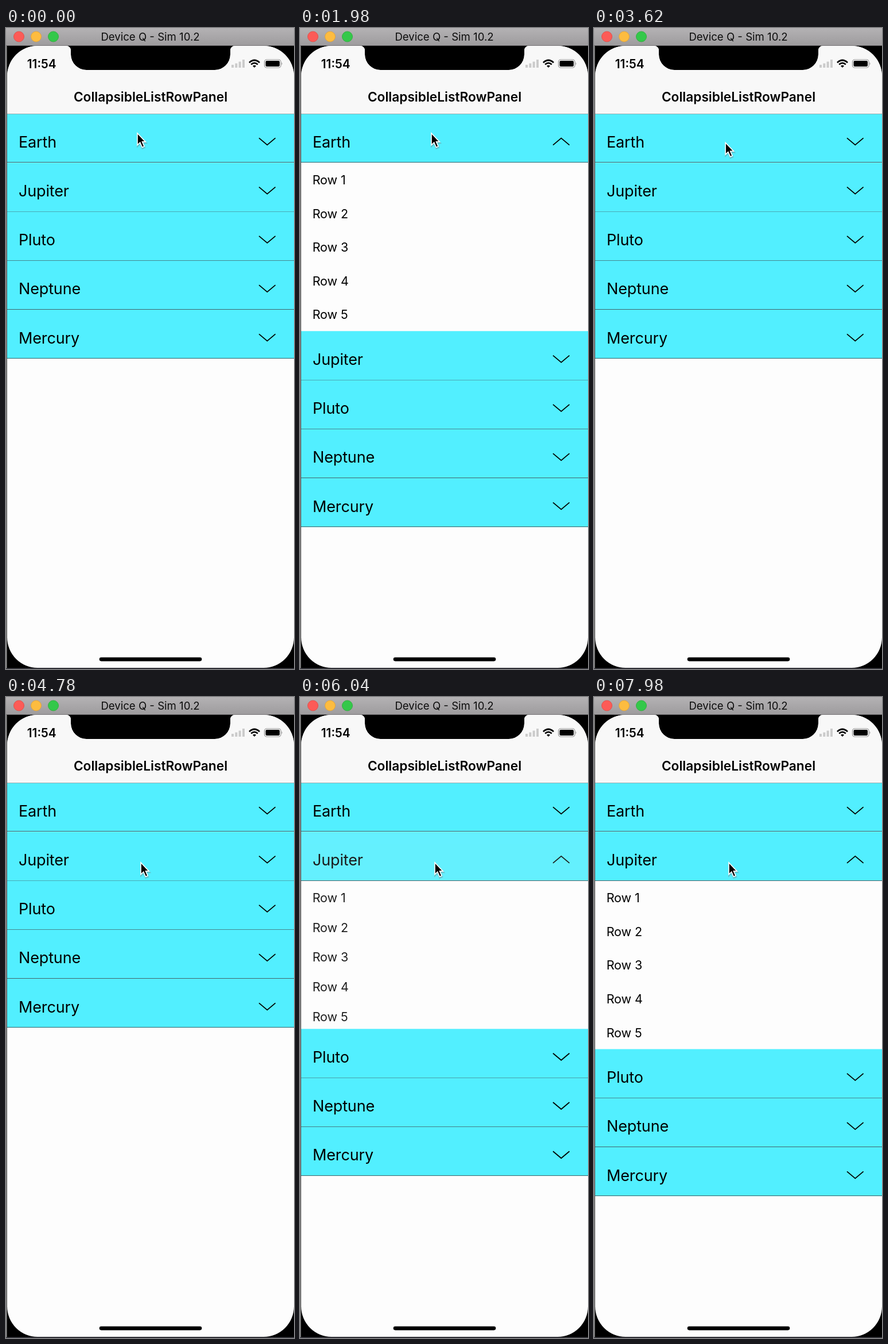
Animation, 502 px wide and 1115 px high, one loop 8 s. Source, as an HTML page:

```html
<!DOCTYPE html>
<html lang="en">
<head>
<meta charset="utf-8">
<title>Expandable list</title>
<style>
html, body { margin: 0; width: 100%; height: 100%; overflow: hidden; background: #000; }
svg { display: block; font-family: Inter, Roboto, sans-serif; }
.bold { font-weight: 600; }
.name { font-size: 27px; letter-spacing: -.15px; }
.row { font-size: 21.5px; letter-spacing: -.1px; }
.line { shape-rendering: crispEdges; }
.chevron { fill: none; stroke: #000; stroke-width: 1.8; }
</style>
</head>
<body>
<svg id="stage" width="502" height="1115" viewBox="0 0 502 1115">
  <defs>
    <linearGradient id="bar" x2="0" y2="1">
      <stop stop-color="#b4b2b4"/><stop offset="1" stop-color="#9d9b9d"/>
    </linearGradient>
    <clipPath id="screen">
      <path d="M2 84A53 53 0 0 1 55 31H105A8 8 0 0 1 113 39V46A27 27 0 0 0 140 73H364A27 27 0 0 0 391 46V39A8 8 0 0 1 399 31H449A53 53 0 0 1 502 84V1060A53 53 0 0 1 449 1113H55A53 53 0 0 1 2 1060Z"/>
    </clipPath>
    <path id="arrow" d="M0 0V20.5L4.7 16.2L8.3 24.5L12 22.9L8.5 14.9H14.2Z"/>
  </defs>

  <rect width="502" height="1115"/>
  <rect y="31" width="1.5" height="1084" fill="#969696"/>
  <rect y="1113.5" width="502" height="1.5" fill="#3c3c44"/>
  <rect width="502" height="31" fill="url(#bar)"/>
  <rect y="30" width="502" height="1" fill="#777577"/>
  <g stroke-width=".8">
    <circle cx="22.5" cy="15" r="9" fill="#fc5b57" stroke="#e2463f"/>
    <circle cx="52.5" cy="15" r="9" fill="#fdbc40" stroke="#e0a035"/>
    <circle cx="82.5" cy="15" r="9" fill="#34c84a" stroke="#27ab35"/>
  </g>
  <text x="251.5" y="22" font-size="18.6" text-anchor="middle" fill="#0c0c0c">Device Q - Sim 10.2</text>

  <g clip-path="url(#screen)">
    <rect y="31" width="502" height="1084" fill="#fdfdfd"/>
    <rect y="31" width="502" height="118" fill="#f8f8f8"/>
    <g id="list"></g>
    <rect class="line" y="149" width="502" height="1" fill="#93aeb2"/>
  </g>

  <text class="bold" x="36.8" y="69.5" font-size="20.8">11:54</text>
  <text class="bold" x="252" y="128" font-size="22.67" text-anchor="middle">CollapsibleListRowPanel</text>
  <path d="M393 64h4v5h-4zM399.3 61.5h4v7.5h-4zM405.6 58.5h4V69h-4zM412 55h4v14h-4z" fill="#cbcbcb"/>
  <g fill="none" stroke="#000" stroke-width="2.7">
    <path d="M424 60.2Q433 51.8 442 60.2M427.2 63.5Q433 58.2 438.8 63.5"/>
    <path d="M433 69L430 66Q433 63.4 436 66Z" fill="#000" stroke="none"/>
  </g>
  <rect x="450.5" y="55" width="28.5" height="14" rx="3.8" fill="none" stroke="#8f8f8f" stroke-width="1.2"/>
  <rect x="452.5" y="57" width="24.5" height="10" rx="2"/>
  <path d="M480.5 59.5Q482.5 62 480.5 64.5Z" fill="#8f8f8f"/>
  <rect x="162.7" y="1094.7" width="178.6" height="6.7" rx="3.3"/>

  <g id="cursor">
    <use href="#arrow" x=".5" y="1.8" fill="#777" stroke="#777" stroke-width="3" opacity=".35"/>
    <use href="#arrow" stroke="#fff" stroke-width="1.6"/>
  </g>
</svg>

<script>
const LOOP = 8000, TOP = 149, PITCH = 85.25, BODY = 293, FADE = 8;
const names = ['Earth', 'Jupiter', 'Pluto', 'Neptune', 'Mercury'];
const list = document.getElementById('list');
const cursor = document.getElementById('cursor');

function add(parent, tag, attrs, text) {
  const el = document.createElementNS('http://www.w3.org/2000/svg', tag);
  for (const key in attrs) el.setAttribute(key, attrs[key]);
  if (text) el.textContent = text;
  return parent.appendChild(el);
}

function addHeader(cell, name, open) {
  const g = add(cell, 'g', {});
  const [ends, tip] = open ? [54.6, 42.6] : [42.4, 54.4];
  add(g, 'rect', { width: 502, height: PITCH, fill: '#52efff' });
  add(g, 'text', { class: 'name', x: 22, y: 58.5 }, name);
  add(g, 'path', { class: 'chevron', d: `M441 ${ends}L455.3 ${tip}L469.6 ${ends}` });
  return g;
}

const cells = names.map(name => {
  const root = add(list, 'g', {});
  const body = add(root, 'g', {});
  const rows = [1, 2, 3, 4, 5].map(i => add(body, 'text', { class: 'row', x: 21.7 }, 'Row ' + i));
  const closed = addHeader(root, name, false);
  const opened = addHeader(root, name, true);
  add(root, 'rect', { class: 'line', y: PITCH - 1, width: 502, height: 1, fill: '#42666b' });
  return { root, body, rows, closed, opened };
});

const move = (el, x, y) => el.setAttribute('transform', `translate(${x} ${y})`);
const alpha = (el, a) => el.setAttribute('opacity', a);

function ease(n, start, length) {
  const p = Math.min(1, Math.max(0, (n - start) / length));
  return p * p * (3 - 2 * p);
}

// Ticks come in threes, lasting 20, 100 and 20 ms.
function tickAt(ms) {
  const rest = ms % 140;
  return 3 * Math.floor(ms / 140) + (rest < 20 ? 0 : rest < 120 ? 1 : 2);
}

function draw(n) {
  const open = [ease(n, 13.46, FADE) - ease(n, 69, FADE), ease(n, 123.73, FADE), 0, 0, 0];
  let y = TOP;
  cells.forEach((cell, i) => {
    const e = open[i];
    move(cell.root, 0, y);
    alpha(cell.closed, 1 - e);
    alpha(cell.opened, e);
    alpha(cell.body, e);
    cell.rows.forEach((row, k) => row.setAttribute('y', 123 + k * e * BODY / 5));
    y += PITCH + e * BODY;
  });
  const m = ease(n, 72, 20);
  move(cursor, 229 + 6 * m * m, 183 + 105 * m);
}

function loop() {
  draw(tickAt(performance.now() % LOOP));
  requestAnimationFrame(loop);
}
loop();
</script>
</body>
</html>
```
